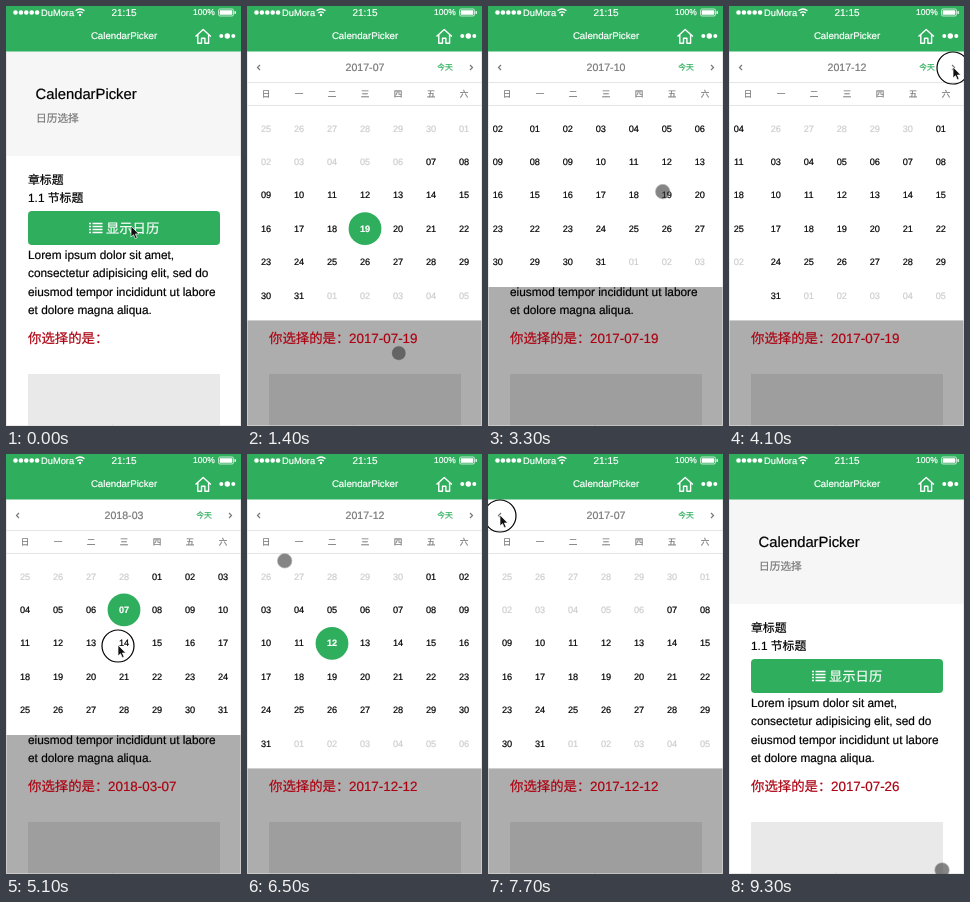
Recreate the animation shown at these times as an HTML page. Size 235 px wide and 420 px high, loop 9400 ms.

```html
<!DOCTYPE html>
<html lang="zh">
<head>
<meta charset="utf-8">
<title>CalendarPicker</title>
<style>
html, body { margin: 0; width: 100%; height: 100%; overflow: hidden; background: #fff; }
svg { display: block; font-family: "Liberation Sans", "Noto Sans CJK SC", "Noto Sans CJK", sans-serif; }
text { fill: currentColor; stroke: currentColor; stroke-width: .2; text-rendering: geometricPrecision; }
.mid { text-anchor: middle; }
</style>
</head>
<body>
<svg width="235" height="420">
  <rect y="45" width="235" height="105" fill="#f6f6f6"/>
  <text x="29.5" y="92.5" font-size="14.8">CalendarPicker</text>
  <text x="30" y="115.5" font-size="10.7" color="#777">日历选择</text>
  <g font-size="11.85">
    <text x="22" y="177.5">章标题</text>
    <text x="22" y="196">1.1 节标题</text>
    <text x="22" y="252.5">Lorem ipsum dolor sit amet,</text>
    <text x="22" y="271">consectetur adipisicing elit, sed do</text>
    <text x="22" y="289.5">eiusmod tempor incididunt ut labore</text>
    <text x="22" y="308">et dolore magna aliqua.</text>
  </g>
  <rect x="22" y="205" width="192" height="34" rx="4" fill="#2fae5d"/>
  <path d="M83 217.500h2m1.500 0h10M83 220.500h2m1.500 0h10M83 223.500h2m1.500 0h10M83 226.500h2m1.500 0h10" stroke="#fff" stroke-width="1.7"/>
  <text x="100" y="227" font-size="13.3" color="#fff">显示日历</text>
  <rect x="22" y="368" width="192" height="52" fill="#e9e9e9"/>
  <text class="mid" x="118" y="425" font-size="9" color="#ccc">Image</text>

  <rect id="shade" y="45" width="235" height="375"/>
  <g font-size="13.4" color="#ac0010">
    <text x="22" y="336.5">你选择的是：</text>
    <text id="chosen" x="102" y="336.5"></text>
  </g>
  <g id="calendar"></g>
  <path d="M.5 46v373.500h234V46" fill="none" stroke="#ddd" stroke-opacity=".6"/>

  <g fill="#fff" color="#fff">
    <rect width="235" height="45.5" fill="#2fae5d"/>
    <path d="M9.500 6.500h22" stroke="#fff" stroke-width="4.6" stroke-linecap="round" stroke-dasharray="0 5.4"/>
    <text x="35" y="9.6" font-size="9.3">DuMora</text>
    <path d="M69.500 4.800q4.500-3.600 9 0M71.200 7q2.800-2.200 5.600 0" fill="none" stroke="#fff" stroke-width="1.3"/>
    <circle cx="74" cy="9" r="1.2"/>
    <text class="mid" x="118" y="9.6" font-size="10">21:15</text>
    <text x="187" y="9.3" font-size="8.5">100%</text>
    <rect x="212.500" y="3" width="15" height="7" rx="1.5" fill="none" stroke="#fff" stroke-width=".7"/>
    <rect x="213.700" y="4.2" width="12.6" height="4.6" rx=".6"/>
    <rect x="228.500" y="5" width="1.3" height="3" rx=".6"/>
    <text class="mid" x="118" y="33" font-size="9.7">CalendarPicker</text>
    <path d="M189.500 30.500l7.700-7 7.700 7M191.800 29v8.300h3.700v-5h3.400v5h3.700v-8.300" fill="none" stroke="#fff" stroke-width="1.4" stroke-linejoin="round"/>
    <circle cx="215.300" cy="30" r="2"/><circle cx="221.300" cy="30" r="2.7"/><circle cx="227.300" cy="30" r="2"/>
  </g>
  <g id="cursor"></g>
</svg>
<script>
const $ = id => document.getElementById(id);
const LOOP = 9400, STEP = 100, W = 235, ROW = 33.4;
const GREEN = '#2fae5d', GREY = '#777';
const clamp = v => Math.max(0, Math.min(1, v));
const smooth = p => p * p * (3 - 2 * p);
const easeOut = p => 1 - (1 - p) ** 2;

// Months are counted from July 2017
const pad = n => String(n).padStart(2, '0');
const dayOf = (month, day) => new Date(2017, 6 + month, day);
const firstOpen = dayOf(0, 7);
const label = m => `${dayOf(m, 1).getFullYear()}-${pad(dayOf(m, 1).getMonth() + 1)}`;
const lead = m => dayOf(m, 1).getDay();
const rowCount = m => Math.ceil((lead(m) + dayOf(m + 1, 0).getDate()) / 7);
const cellAt = i => ({ x: 19 + i % 7 * 33, y: 122.5 + Math.floor(i / 7) * ROW });

// Gestures: where and when the mouse is held, and what that does
const tap = (at, x, y, effect) => ({ at, x, y, hold: 150, dx: 0, ...effect });
const toggle = (at, x, y, open) => tap(at, x, y, { open });
const pick = (at, month, day) => {
  const { x, y } = cellAt(lead(month) + day - 1);
  return tap(at, x, y, { chosen: `${label(month)}-${pad(day)}` });
};
const swipe = (at, x, y, turn) => tap(at, x, y, { hold: 200, dx: -60 * turn, turn, turnAt: at + 100 });
const arrow = (at, turn) => tap(at, 118 + 106 * turn, 62, { turn, turnAt: at });
const repeat = (count, start, gap, make) => Array.from({ length: count }, (_, i) => make(start + i * gap));

const gestures = [
  toggle(200, 125, 221, 1),
  pick(800, 0, 19),
  toggle(1500, 155, 359, -1),
  toggle(1800, 125, 221, 1),
  ...repeat(3, 2100, 450, at => swipe(at, 229, 200, 1)),
  ...repeat(5, 3700, 200, at => arrow(at, 1)),
  pick(4800, 8, 7),
  ...repeat(3, 5100, 330, at => swipe(at, 112, 192, -1)),
  pick(6200, 5, 12),
  ...repeat(6, 6600, 200, at => arrow(at, -1)),
  pick(8400, 0, 26),
  toggle(8800, 213, 416, -1)
];
const total = effect => gestures.reduce((sum, g) => sum + (effect(g) || 0), 0);

const text = (x, y, size, color, str, extra = '') =>
  `<text class="mid" x="${x}" y="${y}" font-size="${size}" color="${color}" ${extra}>${str}</text>`;

function monthGrid(m, dx, chosen) {
  const cells = Array.from({ length: rowCount(m) * 7 }, (_, i) => {
    const date = dayOf(m, 1 - lead(m) + i), day = pad(date.getDate());
    const inside = date.getMonth() === dayOf(m, 1).getMonth();
    const { x, y } = cellAt(i);
    if (inside && `${label(m)}-${day}` === chosen)
      return `<circle cx="${x}" cy="${y}" r="16.4" fill="${GREEN}"/>` + text(x, y + 3, 9.2, '#fff', day, 'font-weight="bold"');
    return text(x, y + 3, 9.2, inside && date >= firstOpen ? '#000' : '#ccc', day);
  });
  return `<g transform="translate(${dx})">${cells.join('')}</g>`;
}

function calendar(pos, chosen, open) {
  if (open <= 0) return '';
  const current = Math.round(pos), left = Math.floor(pos);
  const bottom = 114 + rowCount(current) * ROW;
  const days = [...'日一二三四五六'].map((d, i) => text(cellAt(i).x, 90.5, 8.6, GREY, d)).join('');
  const grids = [left, left + 1].map(m => monthGrid(m, (m - pos) * W, chosen)).join('');
  return `<g transform="translate(0 ${(open - 1) * (bottom - 45)})">
    <rect y="45" width="${W}" height="${bottom - 45}" fill="#fff"/>
    <path d="M0 76.500h235M0 99.500h235" stroke="#ddd" stroke-width=".8"/>
    <path d="M13 59l-2.500 2.500 2.500 2.500M223 59l2.500 2.500-2.500 2.500" fill="none" stroke="${GREY}" stroke-width="1.2"/>
    ${text(118, 65, 10.6, GREY, label(current))}${text(198, 64, 7.8, GREEN, '今天')}${days}${grids}</g>`;
}

// The pointer glides from the end of one gesture to the start of the next
function cursor(t) {
  const next = gestures.find(g => g.at > t);
  const last = gestures.findLast(g => g.at <= t) || next;
  const end = last.at + last.hold;
  const pressed = t >= last.at && t < end;
  const k = next ? smooth(clamp((t - end) / (next.at - end))) : 0;
  const x = last.x + last.dx * clamp((t - last.at) / last.hold);
  const goal = next || last;
  const shape = pressed || t < gestures[0].at
    ? '<path d="M0-1v11l2.500-2.300 1.800 4 1.800-.8-1.700-3.900h3.400z" fill="#111" stroke="#fff" stroke-width=".7"/>'
    : '<circle r="7.3" fill="#333" fill-opacity=".6" stroke="#bbb" stroke-opacity=".6"/>';
  const ring = pressed ? '<circle r="16" fill="none" stroke="#000" stroke-width="1.2"/>' : '';
  return `<g transform="translate(${x + (goal.x - x) * k} ${last.y + (goal.y - last.y) * k})">${ring}${shape}</g>`;
}

let shown = -1;
function draw(now) {
  const t = Math.floor(now % LOOP / STEP) * STEP;
  if (t !== shown) {
    shown = t;
    const picked = gestures.findLast(g => g.chosen && g.at <= t);
    const chosen = picked ? picked.chosen : '';
    const open = total(g => g.open && g.open * clamp((t - g.at - 100) / 200));
    // The first month is the earliest one
    const month = Math.max(0, total(g => g.turn && g.turn * easeOut(clamp((t - g.turnAt) / 305))));
    $('chosen').textContent = chosen;
    $('shade').setAttribute('opacity', .32 * open);
    $('calendar').innerHTML = calendar(month, chosen, open);
    $('cursor').innerHTML = cursor(t);
  }
  requestAnimationFrame(draw);
}
draw(0);
</script>
</body>
</html>
```
